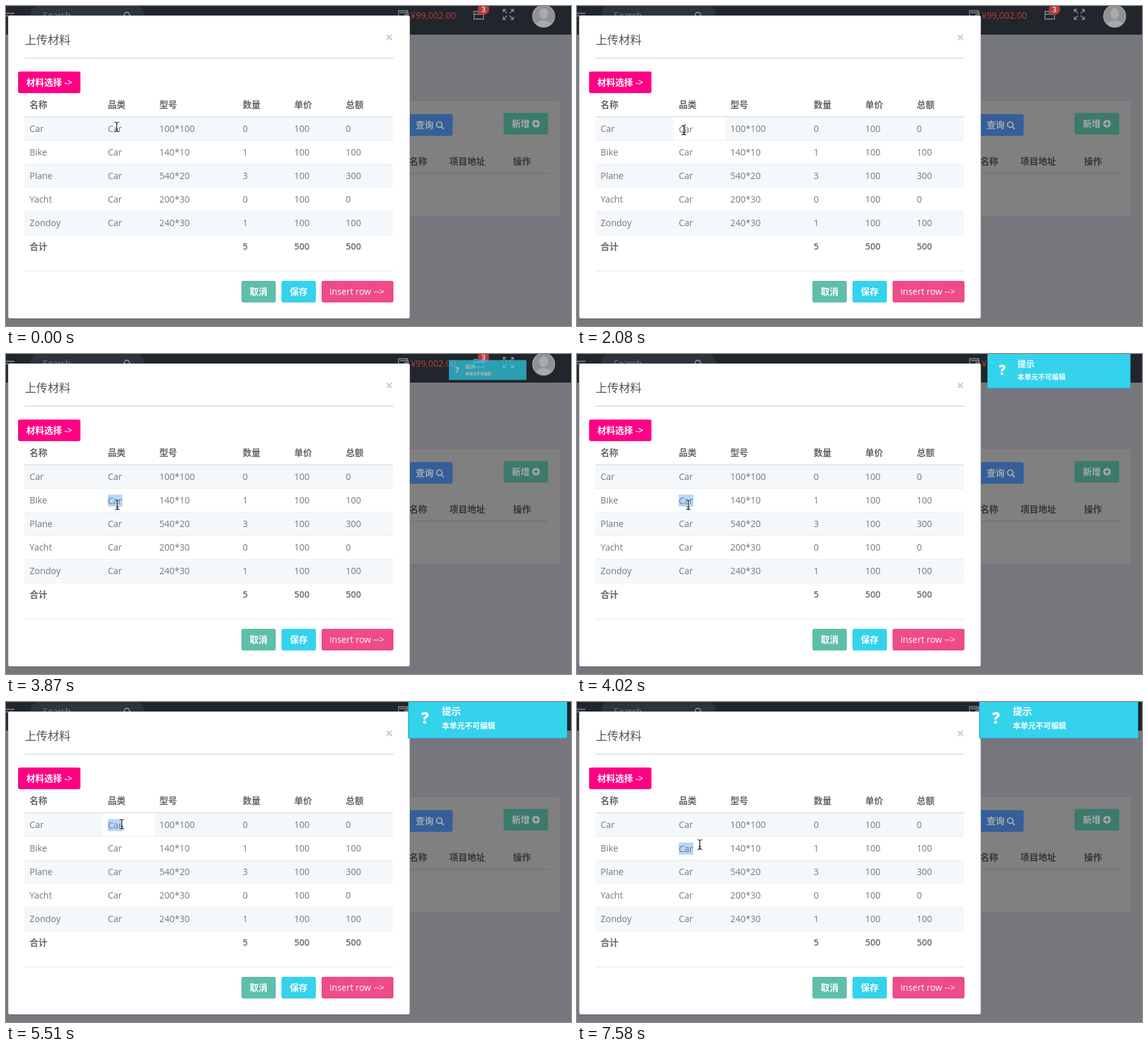
Animation, 888 px wide and 503 px high, one loop 8000 ms. Source, as an HTML page:

```html
<!DOCTYPE html>
<html lang="zh-CN">
<head>
<meta charset="utf-8">
<title>上传材料</title>
<style>
html, body { margin: 0; width: 100%; height: 100%; overflow: hidden; background: #76767d; }
svg { display: block; width: 100%; height: 100%; }
text { font: 14px "Open Sans", "Noto Sans CJK SC", "Noto Sans CJK", sans-serif; fill: #76787b; }
.b { font-weight: 600; fill: #66686b; }
.w { font-weight: 600; fill: #fff; }
.dim { font-weight: 600; fill: #35373a; }
.pale { font-weight: 600; fill: #a4a9ac; }
.icon { fill: none; stroke: #8d9296; stroke-width: 1.3; }

/* Every step is a hard change inside one 8 s loop. */
.a { animation: 8s step-end infinite; }
#cursor { animation-name: cursor; }
#first { animation-name: first; }
#second { animation-name: second; }
#word { animation-name: word; }
#mark { animation-name: mark; }
#caret { animation-name: caret; }
#d1 { animation-name: d1; }
#d2 { animation-name: d2; }
#d3 { animation-name: d3; }
#retyped { animation-name: retyped; }
#toast { animation-name: toast; transform-origin: 757px 25px; }

@keyframes cursor {
  0% { transform: translate(174px, 190px); }
  7.3% { transform: translate(181px, 190px); }
  9.2% { transform: translate(187px, 191px); }
  18.4% { transform: translate(184px, 193px); }
  20.3% { transform: translate(174px, 195px); }
  22.2% { transform: translate(168px, 195px); }
  42.7% { transform: translate(171px, 218px); }
  44.6% { transform: translate(175px, 247px); }
  46.4% { transform: translate(175px, 237px); }
  59.4% { transform: translate(178px, 232px); }
  61.3% { transform: translate(187px, 218px); }
  63.2% { transform: translate(192px, 206px); }
  65.1% { transform: translate(188px, 200px); }
  68.8% { transform: translate(182px, 192px); }
  74.4% { transform: translate(193px, 194px); }
  85.6% { transform: translate(195px, 200px); }
  87.4% { transform: translate(199px, 216px); }
  89.3% { transform: translate(203px, 228px); }
  91.1% { transform: translate(203px, 234px); }
  94.7%, 100% { transform: translate(193px, 224px); }
}
@keyframes first {
  0%, 46.4%, 94.7%, 100% { opacity: 0; }
  1.8%, 68.8% { opacity: 1; }
}
@keyframes second {
  0%, 68.8% { opacity: 0; }
  46.4%, 94.7%, 100% { opacity: 1; }
}
@keyframes word {
  0%, 68.8% { opacity: 1; }
  33.4%, 78.1%, 100% { opacity: 0; }
}
@keyframes mark {
  0%, 27.8%, 68.8% { opacity: 1; }
  12.8%, 33.4%, 78.1%, 100% { opacity: 0; }
}
@keyframes caret {
  0% { opacity: 0; transform: translateX(160px); }
  12.8% { opacity: 1; transform: translateX(182px); }
  26% { opacity: 1; transform: translateX(169px); }
  27.8% { opacity: 0; transform: translateX(169px); }
  33.4% { opacity: 1; transform: translateX(168px); }
  37.2% { opacity: 1; transform: translateX(176px); }
  39.1% { opacity: 1; transform: translateX(183px); }
  46.4% { opacity: 0; transform: translateX(183px); }
  81.8%, 100% { opacity: 1; transform: translateX(191px); }
}
@keyframes d1 { 0%, 46.4%, 100% { opacity: 0; } 33.4% { opacity: 1; } }
@keyframes d2 { 0%, 46.4%, 100% { opacity: 0; } 37.2% { opacity: 1; } }
@keyframes d3 { 0%, 46.4%, 100% { opacity: 0; } 39.1% { opacity: 1; } }
@keyframes retyped { 0%, 94.7%, 100% { opacity: 0; } 81.8% { opacity: 1; } }
@keyframes toast {
  0% { opacity: 0; transform: scale(.3); }
  48.3% { opacity: .7; transform: scale(.488); }
  50.1% { opacity: 1; transform: scale(.9); }
  52%, 100% { opacity: 1; transform: none; }
}
</style>
</head>
<body>
<svg viewBox="0 0 888 503" preserveAspectRatio="none">
  <!-- dimmed page -->
  <rect width="888" height="503" fill="#76767d"/>
  <rect width="888" height="45" fill="#20262c"/>
  <path class="icon" d="M0 11.5H13M0 15.5H13"/>
  <rect x="38" y="-2" width="180" height="34" rx="17" fill="#2d343b"/>
  <text class="pale" x="58" y="20" style="font-weight:500;fill:#777d82">Search</text>
  <g class="icon">
    <circle cx="190" cy="14" r="4.2" stroke-width="1.8"/>
    <path d="M631 10V7.5H617V19.5H632V10.500H619M632 13.500H627V16.500H632"/>
    <path d="M735.5 20.500V8.500H741L742.500 10.500H750.500V20.500ZM735.500 13H750.500"/>
    <path d="M787.500 11.500L781.500 5.500M781.500 10V5.500H786M791.500 11.500L797.500 5.500M793 5.500H797.500V10M787.500 15L781.500 21M781.500 16.500V21H786M791.500 15L797.500 21M793 21H797.500V16.500"/>
  </g>
  <text x="636" y="20" style="fill:#c13a3c">¥99,002.00</text>
  <circle cx="750.500" cy="5" r="9" fill="#b93a3c"/>
  <text x="750.500" y="9.500" text-anchor="middle" style="font-size:12px;font-weight:700;fill:#c8c8c8">3</text>
  <clipPath id="round"><circle cx="845" cy="16" r="16.500"/></clipPath>
  <circle cx="845" cy="16" r="18" fill="#a3a5a7"/>
  <g clip-path="url(#round)">
    <rect x="827" y="-2" width="36" height="36" fill="#8f9193"/>
    <g fill="#a8aaab"><ellipse cx="845" cy="12" rx="7" ry="8.500"/><ellipse cx="845" cy="32" rx="14" ry="9.500"/></g>
  </g>

  <rect x="600" y="148.500" width="272" height="182" rx="4" fill="#7f807f" stroke="#727377"/>
  <rect x="600" y="170" width="102" height="34" rx="3" fill="#355f98"/>
  <text class="pale" x="644" y="192">查询</text>
  <g class="icon" style="stroke:#a4a9ac;stroke-width:2">
    <circle cx="681" cy="186.500" r="4.300"/><path d="M684.300 189.800L688 193.500"/>
  </g>
  <rect x="782" y="168" width="70" height="34" rx="3" fill="#3c7a6c"/>
  <text class="pale" x="795" y="190">新增</text>
  <circle cx="833" cy="185" r="6" fill="#a4a9ac"/>
  <path d="M829.500 185H836.500M833 181.500V188.500" stroke="#3c7a6c" stroke-width="2"/>
  <text class="dim" y="249"><tspan x="634">名称</tspan><tspan x="697">项目地址</tspan><tspan x="797">操作</tspan></text>
  <rect x="600" y="262" width="252" height="2" fill="#737577"/>

  <!-- dialog -->
  <rect x="3" y="15" width="632" height="477" rx="3" fill="#6a6a70"/>
  <rect x="3.500" y="15" width="631" height="476" rx="2.500" fill="#fff"/>
  <text x="29.500" y="60" style="font-size:18px;font-weight:500;fill:#505458">上传材料</text>
  <text x="602.500" y="57" text-anchor="middle" style="font-size:21px;font-weight:700;fill:#ccc">×</text>
  <rect x="29" y="81" width="580" height="2" fill="#e3e3e3"/>
  <rect x="19" y="103" width="98" height="34" rx="3" fill="#ff0084"/>
  <text class="w" x="32" y="125">材料选择 -&gt;</text>

  <g fill="#f4f8fb">
    <rect x="29" y="175" width="579" height="36"/>
    <rect x="29" y="249" width="579" height="36"/>
    <rect x="29" y="323" width="579" height="36"/>
  </g>
  <rect x="29" y="173" width="579" height="2" fill="#e6eaed"/>
  <path d="M29 211.500H608M29 248.500H608M29 285.500H608M29 322.500H608M29 359.500H608" stroke="#ebeff2"/>
  <text class="b" y="160"><tspan x="37">名称</tspan><tspan x="160">品类</tspan><tspan x="241">型号</tspan><tspan x="372">数量</tspan><tspan x="453">单价</tspan><tspan x="534">总额</tspan></text>
  <text y="198"><tspan x="37">Car</tspan><tspan x="160">Car</tspan><tspan x="241">100*100</tspan><tspan x="372">0</tspan><tspan x="453">100</tspan><tspan x="534">0</tspan></text>
  <text y="235"><tspan x="37">Bike</tspan><tspan x="160">Car</tspan><tspan x="241">140*10</tspan><tspan x="372">1</tspan><tspan x="453">100</tspan><tspan x="534">100</tspan></text>
  <text y="272"><tspan x="37">Plane</tspan><tspan x="160">Car</tspan><tspan x="241">540*20</tspan><tspan x="372">3</tspan><tspan x="453">100</tspan><tspan x="534">300</tspan></text>
  <text y="309"><tspan x="37">Yacht</tspan><tspan x="160">Car</tspan><tspan x="241">200*30</tspan><tspan x="372">0</tspan><tspan x="453">100</tspan><tspan x="534">0</tspan></text>
  <text y="346"><tspan x="37">Zondoy</tspan><tspan x="160">Car</tspan><tspan x="241">240*30</tspan><tspan x="372">1</tspan><tspan x="453">100</tspan><tspan x="534">100</tspan></text>
  <text class="b" y="383"><tspan x="37">合计</tspan><tspan x="372">5</tspan><tspan x="453">500</tspan><tspan x="534">500</tspan></text>

  <!-- cells being edited -->
  <g id="first" class="a">
    <rect x="152" y="175" width="81" height="36" fill="#fff"/>
    <rect id="mark" class="a" x="160" y="184" width="23" height="19" fill="#b3d7ff"/>
    <text id="word" class="a" x="160" y="199">Car</text>
    <text id="d1" class="a" x="160" y="199">1</text>
    <text id="d2" class="a" x="168" y="199">2</text>
    <text id="d3" class="a" x="176" y="199">3</text>
    <text id="retyped" class="a" x="160" y="199">2312</text>
    <rect id="caret" class="a" y="185" width="1" height="18" fill="#555"/>
  </g>
  <g id="second" class="a">
    <rect x="152" y="212" width="81" height="36" fill="#fff"/>
    <rect x="160" y="221" width="23" height="19" fill="#b3d7ff"/>
    <text x="160" y="236">Car</text>
  </g>

  <rect x="29" y="416" width="580" height="1" fill="#e5e5e5"/>
  <rect x="370" y="432" width="54" height="34" rx="3" fill="#5fbeaa"/>
  <rect x="433" y="432" width="54" height="34" rx="3" fill="#34d3eb"/>
  <rect x="496" y="432" width="113" height="34" rx="3" fill="#ee4b89"/>
  <text class="w" y="454"><tspan x="383">取消</tspan><tspan x="446">保存</tspan></text>
  <text class="w" x="508.500" y="454" style="font-weight:500">insert row --&gt;</text>

  <!-- notice -->
  <g id="toast" class="a">
    <rect x="632" y="-7" width="250" height="64.500" rx="2" fill="#1f9ede"/>
    <rect x="633" y="-6" width="248.500" height="62.500" rx="2" fill="#34d3eb"/>
    <text class="w" x="658.500" y="34" text-anchor="middle" style="font-size:24px;font-weight:800">?</text>
    <text class="w" x="685" y="20" style="font-size:15px;font-weight:700">提示</text>
    <text class="w" x="685" y="42" style="font-size:12px">本单元不可编辑</text>
  </g>

  <g id="cursor" class="a" fill="none">
    <path id="beam" d="M-3.500 -7.500Q0 -7.500 0 -5.500Q0 -7.500 3.500 -7.500M0 -6V6M-3.500 7.500Q0 7.500 0 5.500Q0 7.500 3.500 7.500M-2 3.500H2" stroke="#fff" stroke-width="2.600" stroke-opacity=".8"/>
    <path d="M-3.500 -7.500Q0 -7.500 0 -5.500Q0 -7.500 3.500 -7.500M0 -6V6M-3.500 7.500Q0 7.500 0 5.500Q0 7.500 3.500 7.500M-2 3.500H2" stroke="#111" stroke-width="1.200"/>
  </g>
</svg>
</body>
</html>
```
